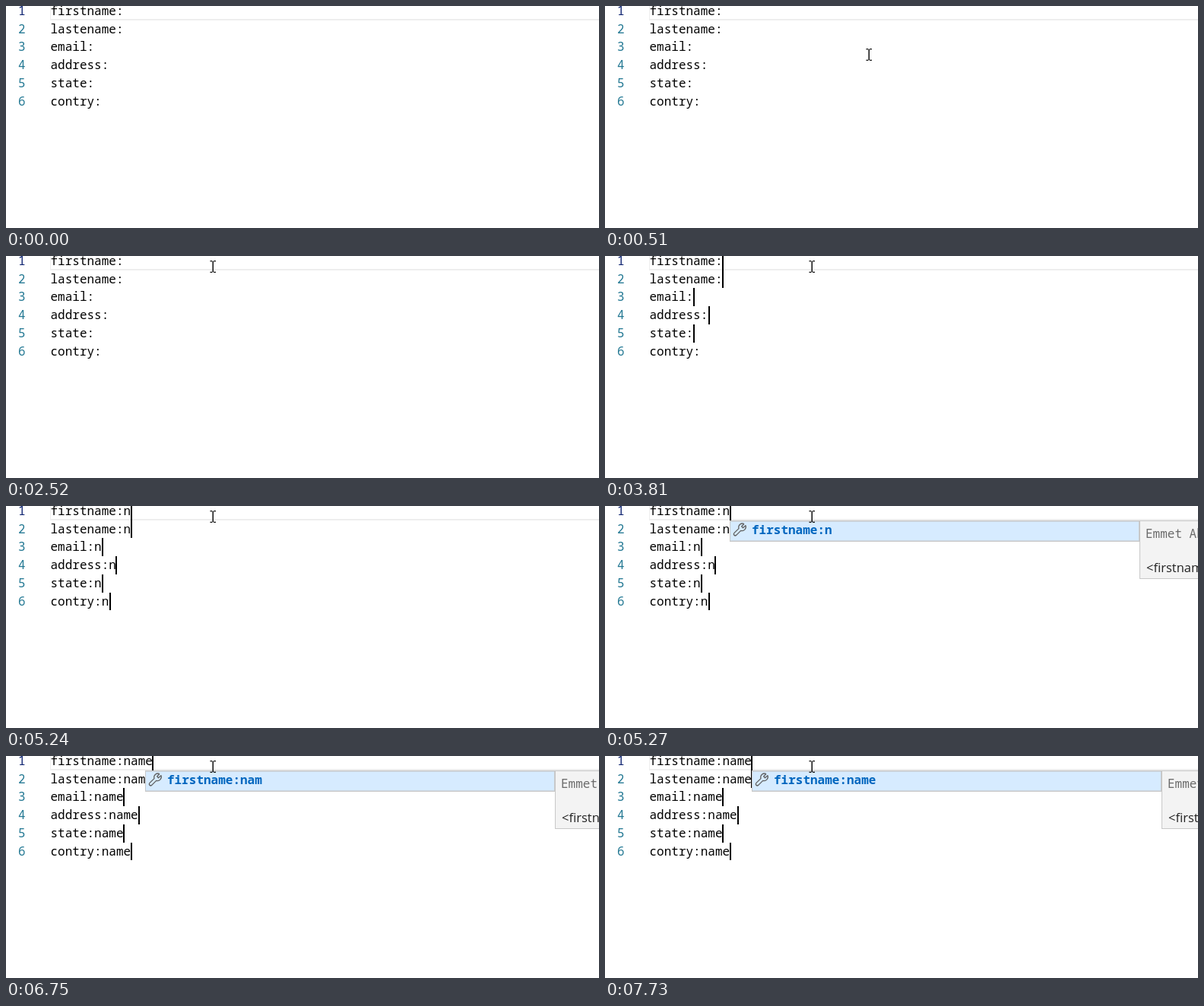
Write an HTML page with a canvas that moves like this. It is 780 px wide and 292 px high and loops after 8 s.

```html
<!DOCTYPE html>
<html lang="en">
<head>
<meta charset="utf-8">
<title>Multi-cursor typing</title>
<style>
  html, body { margin: 0; width: 100%; height: 100%; overflow: hidden; background: #fff; }
  canvas { display: block; }
</style>
</head>
<body>
<canvas id="stage" width="780" height="292"></canvas>
<script>
const ctx = document.getElementById('stage').getContext('2d');
const LOOP = 8000;
const MONO = '16px "Noto Sans Mono", "DejaVu Sans Mono", monospace';
const SANS = '16.5px "Open Sans", "Noto Sans", sans-serif';

const LINES = ['firstname:', 'lastename:', 'email:', 'address:', 'state:', 'contry:'];
const WORD = 'name';
const LEFT = 58.5, PITCH = 9.6, ROW = 23.75;

const typedAt = [5240, 5420, 5570, 6750];
const popupAt = [5270, 5420, 5600, 6780];
const caretAddedAt = [0, 2960, 3250, 3530, 3810, 4100];
const caretOn = [[1090, 1540], [2030, 2520], [2960, 4590], [5080, 6090], [6550, 7240], [7730, LOOP]];

const countPast = (times, t) => times.filter(at => t >= at).length;
const rowTop = i => -5.25 + ROW * i;
const endX = str => LEFT + PITCH * str.length;
const snapEven = x => 2 * Math.round(x / 2);
const clamp01 = v => Math.min(1, Math.max(0, v));
const mix = (a, b, k) => a + (b - a) * k;

function box(x, y, w, h, color) {
  ctx.fillStyle = color;
  ctx.fillRect(x, y, w, h);
}

function text(str, x, y, color, font = MONO) {
  ctx.font = font;
  ctx.fillStyle = color;
  ctx.fillText(str, x, y);
}

function drawEditor(t) {
  box(58, 17, 722, 2, '#eeeeee');
  box(58, 0, 1, 17, '#eeeeee');
  const typed = WORD.slice(0, countPast(typedAt, t));
  const blinkOn = caretOn.some(([from, to]) => t >= from && t < to);
  LINES.forEach((label, i) => {
    const line = label + typed;
    const base = Math.floor(rowTop(i) + 17.5);
    text(String(i + 1), 16, base, i ? '#237893' : '#0b216f');
    text(line, LEFT, base, '#000');
    if (blinkOn && t >= caretAddedAt[i]) {
      const top = Math.round(rowTop(i));
      box(snapEven(endX(line)), top, 2, Math.round(rowTop(i + 1)) - top, '#000');
    }
  });
}

function drawWrench(x, y) {
  ctx.save();
  ctx.translate(x, y);
  ctx.strokeStyle = '#5f5f5f';
  ctx.lineWidth = 1.3;
  ctx.lineJoin = 'round';
  ctx.beginPath();
  ctx.moveTo(14.5, 1.5);
  ctx.lineTo(11.2, 4.8);
  ctx.lineTo(13, 6.8);
  ctx.lineTo(16.4, 3.6);
  ctx.bezierCurveTo(18, 7.5, 14.5, 11.6, 10.2, 10.4);
  ctx.lineTo(4.2, 16.4);
  ctx.bezierCurveTo(2, 18, -0.3, 15.4, 1.5, 13.4);
  ctx.lineTo(7.5, 7.6);
  ctx.bezierCurveTo(6.2, 3.2, 10.4, -0.2, 14.5, 1.5);
  ctx.stroke();
  ctx.restore();
}

function drawPopup(t) {
  const n = countPast(popupAt, t);
  if (!n) return;
  const label = LINES[0] + WORD.slice(0, n);
  const x = Math.round(endX(label));
  box(x, 19, 540, 28, '#c8c8c8');
  box(x + 1, 20.5, 537, 25, '#d6ebff');
  drawWrench(x + 4.5, 22);
  text(label, x + 29, 37, '#0066bf', 'bold ' + MONO);

  const side = x + 539;
  box(side, 19, 300, 77, '#c8c8c8');
  box(side + 1, 20, 298, 75, '#f3f3f3');
  text('Emmet Abbreviation', side + 8, 42, '#6b6b6b');
  text(`<${label}>|</${label}>`, side + 9, 87, '#222', SANS);
}

function drawPointer(t) {
  if (t < 100) return;
  const k = clamp01((t - 100) / 710);
  const glide = 1 - (1 - k) * (1 - k);
  const nudge = clamp01((t - 900) / 110);
  const x = Math.round(mix(691, 273, glide) - nudge);
  const y = Math.round(mix(260, 22, glide) - 8 * nudge);

  const pressed = t >= 1020 && t < 1120;
  if (pressed) {
    ctx.fillStyle = '#ffff66';
    ctx.beginPath();
    ctx.arc(270, 13, 15, 0, Math.PI * 2);
    ctx.fill();
  }
  const ink = pressed ? '#55551c' : '#111';
  box(x - 0.5, y - 7, 1.5, 14, ink);
  for (const edge of [y - 8, y + 6.7]) {
    box(x - 3.5, edge, 3, 1.3, ink);
    box(x + 1, edge, 3, 1.3, ink);
  }
}

function frame(now) {
  const t = now % LOOP;
  box(0, 0, 780, 292, '#fff');
  drawEditor(t);
  drawPopup(t);
  drawPointer(t);
  requestAnimationFrame(() => frame(performance.now() - start));
}

const start = performance.now();
frame(0);
</script>
</body>
</html>
```
